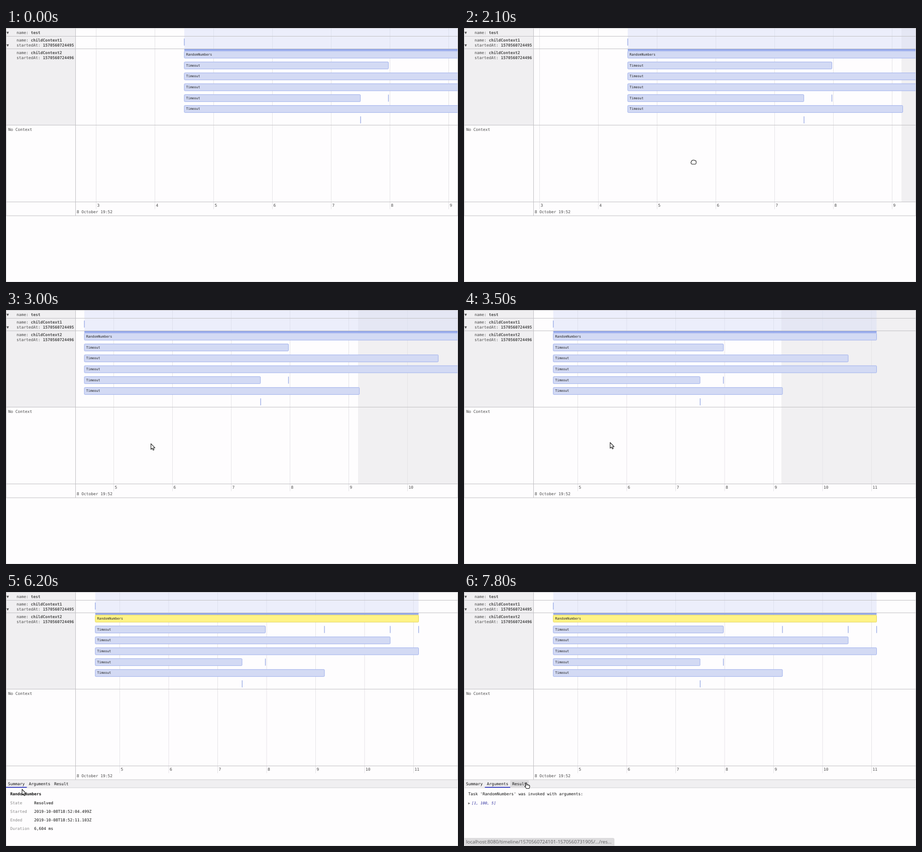
An HTML page that plays this animation: 900x506 px, repeating every 8000 ms.

```html
<!DOCTYPE html>
<html lang="en">
<head>
<meta charset="utf-8">
<title>Task timeline</title>
<style>
  html, body { margin: 0; width: 100%; height: 100%; overflow: hidden; background: #fefdfe; }
  svg { display: block; width: 100vw; height: 100vh; }
  text { font: 7.92px "DejaVu Sans Mono", monospace; fill: #4a4a4a; }
  text.bar { font-size: 6.6px; fill: #222; }
  text.black { fill: #111; }
  text.grey { fill: #8a8a8a; }
  text.value { font-size: 7.3px; font-style: italic; fill: #2a2a9c; }
  text.arrow { font-size: 7px; fill: #777; }
  text.status { font: 9.6px "Open Sans", sans-serif; fill: #5a5a5c; }
  .bold { font-weight: bold; }
</style>
</head>
<body>
<svg viewBox="0 0 900 506">
  <defs><clipPath id="plot"><rect x="139" y="1" width="760" height="373"/></clipPath></defs>
  <g id="scene"></g>
</svg>
<script>
const LOOP = 8000, STEP = 100;
const GRAB = 1900, DROP = 2900, ZOOM = 3200, LOADED = 4200, OPENED = 5200, SWITCHED = 7200;
const START = 4.5, END = 11.103, LOADED_TO = 9.158;
const BAR_ENDS = [END, 7.974, 10.523, END, 7.497, 9.18];

// Keys are [time, ...values]
const DRAG = [[GRAB, 0], [2100, -29], [2600, -162], [DROP, -199]];
const POINTER = [
  [1300, 860, 190], [1700, 500, 262], [GRAB, 486, 267], [2100, 457, 267],
  [2600, 325, 267], [DROP, 288, 267], [3400, 291, 264], [4000, 291, 264],
  [4300, 303, 205], [4600, 319, 86], [4800, 319, 52], [5600, 319, 52],
  [6100, 38, 391], [6200, 32, 393], [6500, 61, 391], [6700, 90, 391],
  [6900, 80, 383], [7300, 80, 383], [7600, 122, 380], [7700, 124, 380]
];
const TABS = [
  { name: 'Summary', x: 0, w: 41.5 },
  { name: 'Arguments', x: 41.5, w: 50.5, link: 'arg' },
  { name: 'Result', x: 92, w: 37, link: 'res' }
];
const CURSORS = {
  arrow: 'M0 0V11.3L2.6 9 4.4 12.8 6.2 12 4.6 8.3H8Z',
  grab: 'M-5 2V0Q-5-1-3.7-1V-2Q-3.5-4-1.8-3.3Q0-4.6 1.4-3.3Q3-4 3.6-2.6Q5.2-2.6 5.2-1V2Q5 4.2 3.4 4.2H-2.8Q-4.2 4.2-5 2Z',
  hand: 'M-1 6V1Q0-.8 1 1V4.2Q2.5 3.4 3.2 4.6Q4.8 4 5.3 5.2Q6.8 4.8 6.8 6.4V8.4L5.6 11.5H.4L-3 7.4Q-2.6 5.4-1 7Z'
};

const at = (keys, t) => {
  if (t <= keys[0][0]) return keys[0].slice(1);
  const i = keys.findIndex(k => k[0] > t);
  if (i < 0) return keys[keys.length - 1].slice(1);
  const a = keys[i - 1], b = keys[i], p = (t - a[0]) / (b[0] - a[0]);
  return a.slice(1).map((v, j) => v + (b[j + 1] - v) * p);
};
const rect = (x, y, w, h, fill, more = '') =>
  `<rect x="${x}" y="${y}" width="${w}" height="${h}" fill="${fill}" ${more}/>`;
const text = (x, y, s, cls = '') => `<text x="${x}" y="${y}" class="${cls}">${s}</text>`;
const bold = s => `<tspan class="bold">${s}</tspan>`;
const rowY = i => 46 + 21.67 * i;

function plot(t) {
  const zoomed = t >= ZOOM, loaded = t >= LOADED;
  const scale = zoomed ? 97.5 : 117;
  const five = zoomed ? 226.5 : 413.5 + at(DRAG, t)[0];
  const px = s => five + (s - 5) * scale;
  const x = px(START), span = s => (s - START) * scale;
  const tick = (s, y) => rect(px(s) - .6, y, 1.3, 14, '#97a9e4');
  let out = loaded ? '' : rect(px(LOADED_TO), 1, 900, 345, '#f1f0f2');
  for (let s = 2; s < 13; s++) {
    out += rect(px(s) - .5, 1, 1, 360, '#e5e4e7') + text(px(s) + 2, 356.3, s);
  }
  out += rect(x, 1, span(END), 41, 'rgba(214,219,245,.45)');
  out += rect(x, 42, span(END), 3.5, '#93a7eb') + tick(START, 21);
  BAR_ENDS.forEach((end, i) => {
    const picked = i == 0 && t >= OPENED;
    out += rect(x, rowY(i), span(end), 14, picked ? '#fff386' : '#d3daf4',
      `rx="1.3" stroke="${picked ? '#e2d65c' : '#a0b1ec'}"`);
    out += text(x + 3.7, rowY(i) + 9.1, i ? 'Timeout' : 'RandomNumbers', 'bar');
  });
  out += tick(7.974, rowY(4)) + tick(7.5, rowY(6));
  if (loaded) out += [9.18, 10.523, END].map(s => tick(s, rowY(1))).join('');
  return `<g clip-path="url(#plot)">${out}</g>`;
}

function frame() {
  const line = '#c3c2c5';
  return rect(1, 1, 137, 192, '#f0eff1')
    + [16, 41, 193, 346].map(y => rect(1, y, 898, 1, line)).join('')
    + rect(138, 1, 1, 373, line)
    + rect(.5, .5, 899, 505, 'none', 'stroke="#e3e2e5"')
    + rect(.5, .5, 899, 373.5, 'none', `stroke="${line}"`)
    + text(1, 12, '▼') + text(1, 37, '▼')
    + text(21, 12, 'name: ' + bold('test'))
    + text(21, 27.3, 'name: ' + bold('childContext1'))
    + text(21, 36.8, 'startedAt: ' + bold('1570560724495'))
    + text(21, 52.3, 'name: ' + bold('childContext2'))
    + text(21, 61.8, 'startedAt: ' + bold('1570560724496'))
    + text(4.5, 204.5, 'No Context')
    + text(140.7, 369.3, '8 October 19:52');
}

function details(t, hovered) {
  const active = TABS[t >= SWITCHED ? 1 : 0];
  let out = rect(1, 375, 898, 15, '#f0eff1') + rect(1, 389.5, 898, 1, '#d4d3d6');
  for (const tab of TABS) {
    if (tab == hovered) out += rect(tab.x, 375, tab.w, 14.5, '#dddcde');
    if (tab == active) out += rect(tab.x, 388.3, tab.w, 1.7, '#3038c0');
    out += text(tab.x + 4, 385.2, tab.name, 'black');
  }
  if (active.name == 'Summary') {
    out += text(8.5, 405.3, 'RandomNumbers', 'black bold');
    [['State', 'Resolved'], ['Started', '2019-10-08T18:52:04.499Z'],
     ['Ended', '2019-10-08T18:52:11.103Z'], ['Duration', '6,604 ms']].forEach(([k, v], i) => {
      const y = 422.8 + 17 * i;
      out += text(8.5, y, k, 'grey') + text(56, y, v, i ? 'black' : 'bold');
    });
  } else {
    out += text(8.5, 405.3, "Task 'RandomNumbers' was invoked with arguments:", 'black')
      + text(8.3, 422.7, '▶', 'arrow') + text(15.3, 422.7, '[1, 100, 5]', 'value');
  }
  if (hovered?.link) {
    out += rect(-2, 490.5, 301, 20, '#dddcde', 'rx="2" stroke="#d0cfd2" stroke-width=".6"')
      + text(4, 501.3, `localhost:8080/timeline/1570560724101-1570560731905/.../${hovered.link}...`, 'status');
  }
  return out;
}

function draw(now) {
  const t = Math.floor(now % LOOP / STEP) * STEP;
  const [x, y] = at(POINTER, t);
  const open = t >= OPENED;
  const hovered = open && y > 375 && y < 389 && TABS.find(tab => x >= tab.x && x < tab.x + tab.w);
  const onBar = t >= 4900 && y < 60;
  const shape = t >= GRAB && t < DROP ? 'grab' : hovered || onBar ? 'hand' : 'arrow';
  const cursor = t < POINTER[0][0] ? '' :
    `<path d="${CURSORS[shape]}" transform="translate(${x} ${y})" fill="#fff" stroke="#222" stroke-width="1.1" stroke-linejoin="round"/>`;
  document.getElementById('scene').innerHTML =
    plot(t) + frame() + (open ? details(t, hovered) : '') + cursor;
  requestAnimationFrame(draw);
}
draw(performance.now());
</script>
</body>
</html>
```
